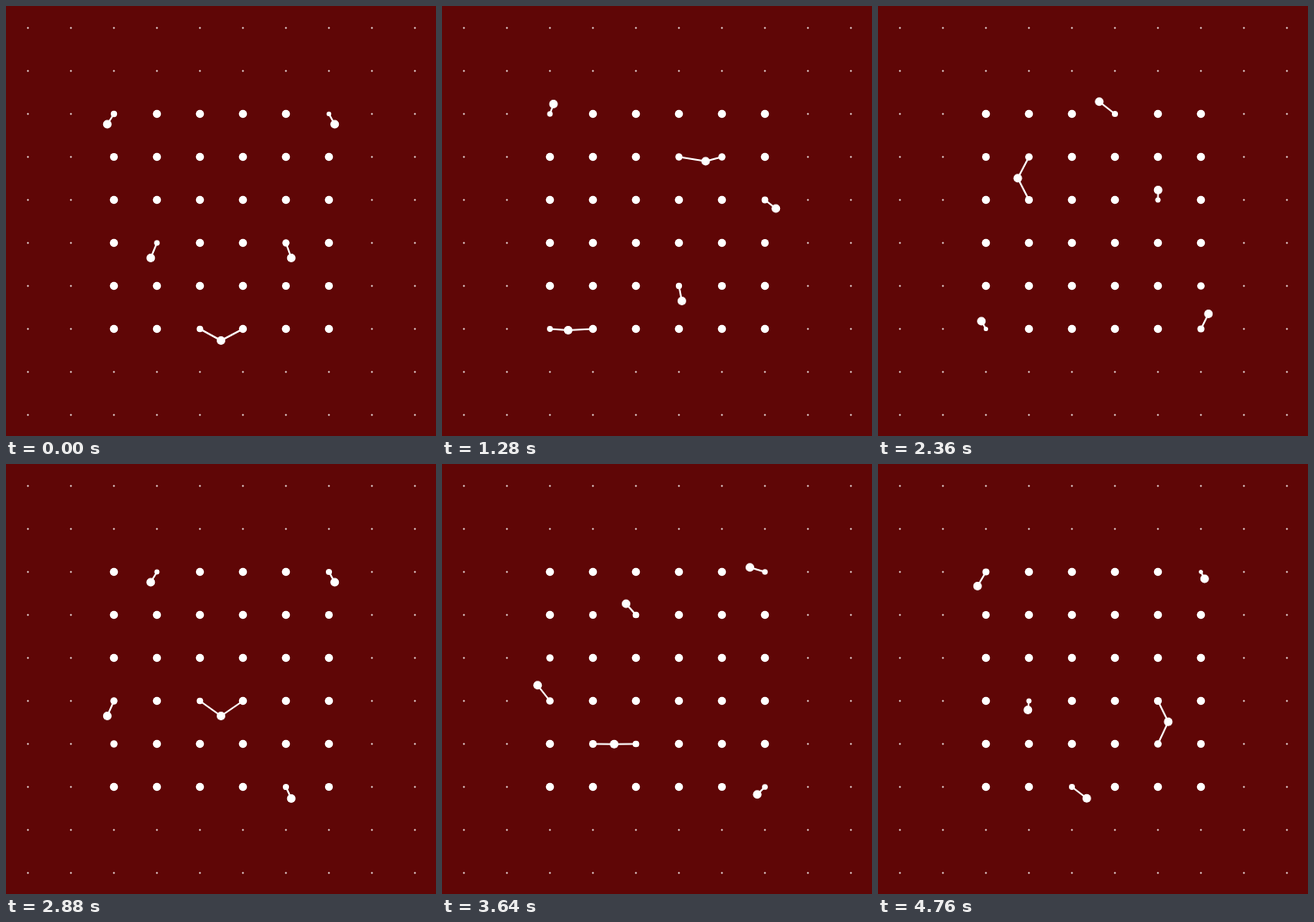
Recreate the animation shown at these times as an HTML page with a canvas. Size 500 px wide and 500 px high, loop 4800 ms.

```html
<!DOCTYPE html>
<html lang="en">
<head>
<meta charset="utf-8">
<title>Orbiting dots on a grid</title>
<style>
  html, body { margin: 0; width: 100%; height: 100%; overflow: hidden; background: #5f0606; }
  canvas { display: block; }
</style>
</head>
<body>
<canvas id="stage" width="500" height="500"></canvas>
<script>
const ctx = document.getElementById('stage').getContext('2d');

const LOOP = 4800, STEP = 40, TAU = Math.PI * 2;
const MOVERS = 5, ORBIT = 139, MOVER_R = 5;
const CELL = 50, COUNT = 10, REACH = 32;
const FULL_R = 4.75, MIN_R = 1.8, OUTER_R = 1;
const EASE = 0.4, MEMORY = 14;

const inner = [], outer = [];
for (let row = 0; row < COUNT; row++) {
  for (let col = 0; col < COUNT; col++) {
    const isInner = [row, col].every(n => n > 1 && n < 8);
    (isInner ? inner : outer).push({ x: 25.5 + col * CELL, y: 25.5 + row * CELL });
  }
}

function moversAt(t) {
  const angle = TAU * t / LOOP;
  return Array.from({ length: MOVERS }, (_, i) => {
    const phase = TAU * i / MOVERS;
    return {
      x: 250 + ORBIT * Math.sin(angle + phase),
      y: 250 + ORBIT * Math.cos(angle - 2 * phase)
    };
  });
}

const dist = (a, b) => Math.hypot(a.x - b.x, a.y - b.y);

// A nearby mover squeezes the dot; the size lags behind by a few steps.
function dotRadius(dot, history) {
  let sum = 0, weight = EASE, total = 0;
  for (const movers of history) {
    const near = Math.min(REACH, ...movers.map(m => dist(dot, m)));
    sum += weight * (MIN_R + (FULL_R - MIN_R) * near / REACH);
    total += weight;
    weight *= 1 - EASE;
  }
  return sum / total;
}

function disc(p, r) {
  ctx.beginPath();
  ctx.arc(p.x, p.y, r, 0, TAU);
  ctx.fill();
}

function link(a, b) {
  ctx.beginPath();
  ctx.moveTo(a.x, a.y);
  ctx.lineTo(b.x, b.y);
  ctx.stroke();
}

function draw(t) {
  const history = Array.from({ length: MEMORY }, (_, k) => moversAt(t - k * STEP));
  const movers = history[0];

  ctx.fillStyle = '#5f0606';
  ctx.fillRect(0, 0, 500, 500);
  ctx.fillStyle = ctx.strokeStyle = '#fff';
  ctx.lineWidth = 2;

  outer.forEach(dot => disc(dot, OUTER_R));
  inner.forEach(dot => {
    disc(dot, dotRadius(dot, history));
    movers.filter(m => dist(dot, m) < REACH).forEach(m => link(dot, m));
  });
  movers.forEach(m => disc(m, MOVER_R));
}

function tick(now) {
  draw(Math.floor((now % LOOP) / STEP) * STEP);
  requestAnimationFrame(tick);
}
draw(0);
requestAnimationFrame(tick);
</script>
</body>
</html>
```
